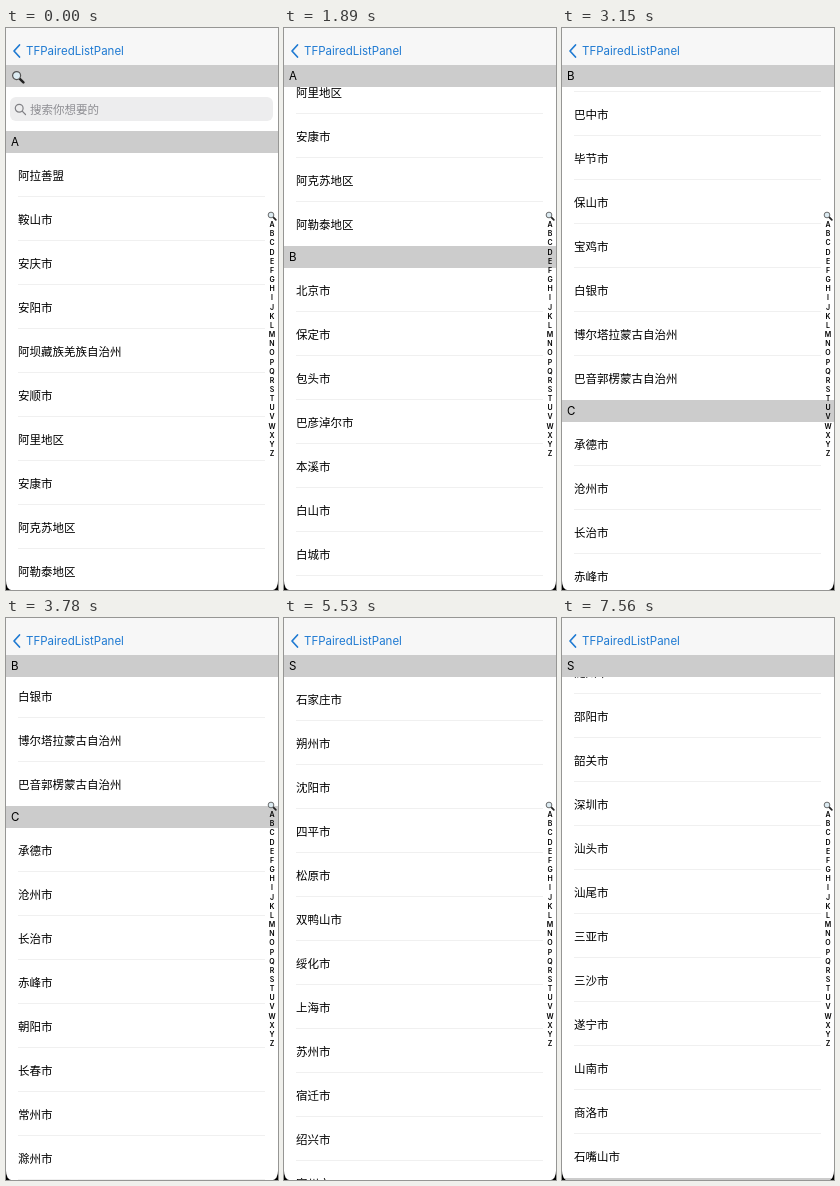
Animation, 272 px wide and 562 px high, one loop 7630 ms. Source, as an HTML page:

```html
<!DOCTYPE html>
<html lang="zh-CN">
<head>
<meta charset="utf-8">
<title>City list</title>
<style>
  html, body { margin: 0; width: 100%; height: 100%; overflow: hidden; background: #000; }
  #stage {
    position: relative; width: 272px; height: 562px; overflow: hidden; background: #fff;
    border-radius: 0 0 5px 5px / 0 0 9px 9px;
    font: 11.5px "Inter", "Noto Sans CJK SC", "Noto Sans CJK", sans-serif; color: #000;
  }
  nav { position: absolute; inset: 0 0 auto; height: 37px; background: #f7f7f7; color: #1f7ad2; }
  nav span { position: absolute; left: 20px; top: 12px; line-height: 22px; white-space: nowrap; }
  nav svg { position: absolute; left: 6px; top: 15px; }
  #list { position: absolute; inset: 37px 0 0; overflow: hidden; isolation: isolate; }
  h2 {
    position: sticky; top: 0; z-index: 1; box-sizing: border-box; height: 22px; margin: 0;
    padding-left: 5px; background: #ccc; font-size: inherit; font-weight: 400; line-height: 22px;
  }
  h2 svg { position: absolute; left: 5px; top: 5px; width: 14px; height: 14px; }
  .row {
    position: relative; height: 44px; padding-left: 12px; line-height: 44px; white-space: nowrap;
    font-family: "Noto Sans CJK SC", "Noto Sans CJK", sans-serif;
  }
  .row:not(:last-child)::after {
    content: ""; position: absolute; left: 12px; right: 13px; bottom: 0; height: 1px; background: #f0f0f0;
  }
  .search { height: 44px; position: relative; }
  .field {
    position: absolute; left: 4px; right: 5px; top: 10px; height: 24px; border-radius: 6px;
    padding-left: 20px; line-height: 24px; background: #ededee; color: #8e8e93;
    font-family: "Noto Sans CJK SC", "Noto Sans CJK", sans-serif;
  }
  .field svg { position: absolute; left: 4px; top: 6px; }
  #index { position: absolute; left: 261px; top: 183px; width: 10px; text-align: center; font-size: 7px; font-weight: 600; }
  #index div { height: 9.16px; line-height: 9.16px; }
  #index svg { width: 10px; height: 10px; display: block; }
</style>
</head>
<body>
<div id="stage">
  <div id="list"></div>
  <nav>
    <svg width="10" height="16" fill="none" stroke="currentColor" stroke-width="1.7" stroke-linecap="round" stroke-linejoin="round"><path d="M7.5 2 2 8l5.5 6"/></svg>
    <span>TFPairedListPanel</span>
  </nav>
  <div id="index"></div>
</div>
<script>
const LOOP = 7630, STEP = 70;
const sections = {
  A: '阿拉善盟 鞍山市 安庆市 安阳市 阿坝藏族羌族自治州 安顺市 阿里地区 安康市 阿克苏地区 阿勒泰地区',
  B: '北京市 保定市 包头市 巴彦淖尔市 本溪市 白山市 白城市 蚌埠市 亳州市 滨州市 北海市 百色市 巴中市 毕节市 保山市 宝鸡市 白银市 博尔塔拉蒙古自治州 巴音郭楞蒙古自治州',
  C: '承德市 沧州市 长治市 赤峰市 朝阳市 长春市 常州市 滁州市 池州市 长沙市 常德市 郴州市 潮州市 崇左市 重庆市 成都市',
  R: '日照市 日喀则市',
  S: '石家庄市 朔州市 沈阳市 四平市 松原市 双鸭山市 绥化市 上海市 苏州市 宿迁市 绍兴市 宿州市 三明市 上饶市 三门峡市 商丘市 十堰市 随州市 邵阳市 韶关市 深圳市 汕头市 汕尾市 三亚市 三沙市 遂宁市 山南市 商洛市 石嘴山市',
  T: '天津市 唐山市 太原市'
};
const lens = `<svg viewBox="0 0 14 14"><path d="M8.6 8.6 12.4 12.4" stroke="#222" stroke-width="2.4" stroke-linecap="round"/>
  <circle cx="5.6" cy="5.6" r="4" fill="#dcebf2" stroke="#555" stroke-width="1.2"/></svg>`;
const searchIcon = `<svg width="13" height="13" fill="none" stroke="#808085" stroke-width="1.2" stroke-linecap="round">
  <circle cx="5.2" cy="5.2" r="3.9"/><path d="M8.2 8.2 11.5 11.5"/></svg>`;

const list = document.getElementById('list');
list.innerHTML =
  `<section><h2>${lens}</h2><div class="search"><div class="field">${searchIcon}搜索你想要的</div></div></section>` +
  Object.entries(sections).map(([letter, cities]) =>
    `<section id="${letter}"><h2>${letter}</h2>` +
    cities.split(' ').map(city => `<div class="row">${city}</div>`).join('') + '</section>').join('');
document.getElementById('index').innerHTML =
  [lens, ...'ABCDEFGHIJKLMNOPQRSTUVWXYZ'].map(entry => `<div>${entry}</div>`).join('');

// Monotone cubic curve through [time, offset] points, starting at rest.
function curve(points) {
  const secants = points.slice(1).map(([t, y], i) => (y - points[i][1]) / (t - points[i][0]));
  const slopes = points.map((_, i) => {
    if (i === 0) return 0;
    const a = secants[i - 1], b = secants[i] ?? a;
    return a * b > 0 ? 2 * a * b / (a + b) : 0;
  });
  return time => {
    if (time <= points[0][0]) return points[0][1];
    const i = points.findIndex(p => p[0] >= time) - 1;
    if (i < 0) return points.at(-1)[1];
    const [t0, y0] = points[i], [t1, y1] = points[i + 1];
    const span = t1 - t0, u = (time - t0) / span, v = 1 - u;
    return y0 * v * v * (1 + 2 * u) + y1 * u * u * (3 - 2 * u)
      + span * u * v * (slopes[i] * v - slopes[i + 1] * u);
  };
}

const firstScroll = curve([
  [980, 0], [1120, 40], [1190, 74], [1330, 163], [1400, 163],
  [2170, 517], [2520, 764], [3150, 1051], [3780, 1235], [4270, 1340]
]);
const secondScroll = curve([[6440, 0], [6790, 175], [7560, 775]]);
const topOf = id => document.getElementById(id).offsetTop;

function offsetAt(time) {
  if (time < 4340) return firstScroll(time);
  if (time < 5530) return topOf('R');
  return topOf('S') + secondScroll(time);
}

function draw() {
  const time = Math.floor(performance.now() % LOOP / STEP) * STEP;
  list.scrollTop = Math.round(offsetAt(time));
  requestAnimationFrame(draw);
}
draw();
</script>
</body>
</html>
```
